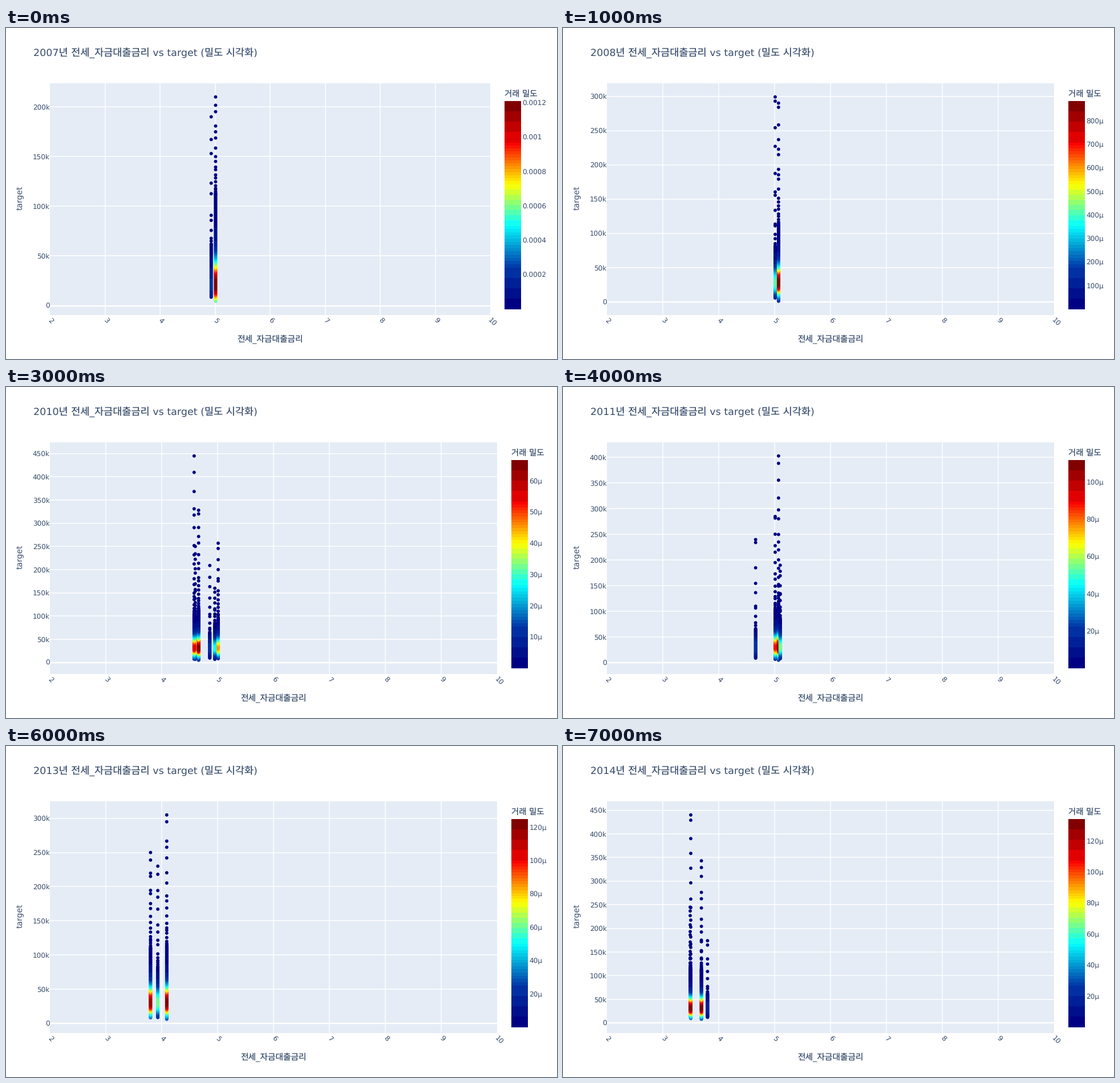
These frames come from a looping animation (966 by 580 pixels, 8000 ms). A matplotlib script:

```python
import numpy as np
import matplotlib.pyplot as plt
from matplotlib.animation import FuncAnimation
from matplotlib.patches import Rectangle

W, H, DPI = 966, 580, 100
PX = 72 / DPI  # points per pixel
INK, PANEL = "#384c6b", "#e5ecf6"
LEFT, TOP, BOTTOM = 77, 97, 502.5
DOT_TOP, DOT_BOTTOM = 120.8, 478.7  # heights of the extreme dots
BAR_TOP, BAR_H = 127.5, 365
RATE = "전세_자금대출금리"

plt.rcParams["font.family"] = ["DejaVu Sans", "Noto Sans CJK JP"]
plt.rcParams["text.hinting"] = "none"

# year, lowest value (k), densest value (k), top density (µ),
# then one (rate, relative density, highest value) per column
CHARTS = [
    (2007, 4.5, 21.5, 1211, [(4.93, 0.16, 190), (5.01, 1, 210)]),
    (2008, 1, 29, 884, [(5.01, 0.47, 299), (5.07, 1, 290)]),
    (2009, 6, 34.5, 71.7, [(4.57, 0.46, 286), (4.86, 0.72, 300),
                           (4.93, 0.58, 218), (5.005, 1, 315)]),
    (2010, 5, 33, 66.7, [(4.6, 0.75, 250), (4.58, 0.85, 445),
                         (4.66, 1, 328), (4.86, 0.18, 209),
                         (4.95, 0.42, 160), (5.01, 0.68, 257)]),
    (2011, 5, 32, 112, [(4.66, 0.2, 240), (5.01, 0.8, 285),
                        (5.07, 1, 403), (5.1, 0.5, 190)]),
    (2012, 7.5, 30, 32.2, [(4.09, 0.86, 245), (4.13, 0.82, 130),
                           (4.42, 0.22, 235), (4.58, 0.17, 220),
                           (5.01, 0.92, 207), (5.07, 1, 353),
                           (5.1, 0.98, 150)]),
    (2013, 6, 31, 125, [(3.8, 0.95, 250), (3.93, 0.5, 230),
                        (4.09, 1, 305)]),
    (2014, 8, 33, 134.2, [(3.49, 0.97, 245), (3.5, 0.98, 440),
                          (3.69, 1, 343), (3.8, 0.14, 174)]),
]

# the colour bar rises through five equal spans, each in flat steps
JET = np.array([(0, 0, 131), (0, 60, 170), (5, 255, 255),
                (255, 255, 0), (250, 0, 0), (128, 0, 0)]) / 255
STEPS = (4, 13, 8, 14, 4)
EDGES = np.append(np.concatenate(
    [(k + np.arange(n) / n) / 5 for k, n in enumerate(STEPS)]), 1)
MID = (EDGES[:-1] + EDGES[1:]) / 2
TONE = EDGES[:-1] * (1 - MID) + EDGES[1:] * MID
BANDS = np.column_stack([np.interp(TONE, np.linspace(0, 1, 6), c)
                         for c in JET.T])


def shade(v):
    i = np.searchsorted(EDGES, v, side="right") - 1
    return BANDS[np.clip(i, 0, len(BANDS) - 1)]


def density(y, peak):
    d = np.abs(y - peak) / np.where(y < peak, 19, 25)
    return (1 + d ** 2.4) ** -1.4


def column(rng, low, weight, top):
    """Packed dots, thinning out towards the highest one."""
    solid = 52 + 60 * weight
    n = int(10 + 12 * weight)
    u = (np.arange(n) + rng.uniform(0, 0.9, n)) / n
    tail = solid + (top - solid) * u ** 2.5
    return np.concatenate([np.arange(low, solid, 0.8), tail, [top]])


def bar_labels(vmax):
    """Ticks at the smallest round step that gives at most eight."""
    step = next(s for s in (5, 10, 20, 50, 100, 200) if vmax / s < 9)
    for v in range(step, int(vmax) + 1, step):
        yield v, f"{v / 1e6:.4f}".rstrip("0") if vmax > 1000 else f"{v}µ"


fig = plt.figure(figsize=(W / DPI, H / DPI), dpi=DPI, facecolor="white")
ax = fig.add_axes([0, 0, 1, 1])


def text(x, y, s, size, **kw):
    ax.text(x, y, s, fontsize=size * PX, color=INK, **kw)


def line(xs, ys, width):
    ax.plot(xs, ys, color="white", lw=width * PX, solid_capstyle="butt",
            zorder=2)


def draw_axes(to_x, to_y, right):
    ax.add_patch(Rectangle((LEFT, TOP), right - LEFT, BOTTOM - TOP,
                           fc=PANEL, lw=0))
    for k in range(2, 11):
        x = to_x(k)
        if 2 < k < 10:
            line([x, x], [TOP, BOTTOM], 1.5)
        digits = len(str(k))
        text(x + 1.5 * digits, 511 + 2.5 * digits, str(k), 12, rotation=-45,
             ha="center", va="center")
    for k in range(0, 500, 50):
        y = to_y(k)
        if y < TOP:
            break
        line([LEFT, right], [y, y], 1.5 if k else 2.5)
        text(76.5, y + 4.5, f"{k}k" if k else "0", 12, ha="right")
    text((LEFT + right) / 2, 550, RATE, 14.7, ha="center")
    text(25, 297.5, "target", 14, rotation=90, ha="center", va="center")


def draw_bar(vmax, x):
    base = BAR_TOP + BAR_H
    ax.bar(np.full(len(BANDS), x), -np.diff(EDGES) * BAR_H, 29,
           bottom=base - EDGES[:-1] * BAR_H, align="edge", color=BANDS,
           lw=0, antialiased=False)
    for v, label in bar_labels(vmax):
        text(x + 31.5, base + 5 - v / vmax * BAR_H, label, 12)
    text(x + 0.5, 119.5, "거래 밀도", 14.4)


def update(i):
    year, low, peak, vmax, cols = CHARTS[i]
    rng = np.random.default_rng(year)
    right = 849 if vmax > 1000 else 861  # long bar labels need room
    high = max(top for _, _, top in cols)
    scale = (DOT_BOTTOM - DOT_TOP) / (high - low)

    def to_x(rate):
        return LEFT + (rate - 2) * (right - LEFT) / 8

    def to_y(value):
        return DOT_BOTTOM - (value - low) * scale

    ax.clear()
    ax.axis("off")
    text(48.5, 48.5, f"{year}년 {RATE} vs target (밀도 시각화)", 17.5)
    draw_axes(to_x, to_y, right)
    for rate, weight, top in cols:
        start = low if weight == 1 else low + rng.uniform(1, 5)
        ys = column(rng, start, weight, top)
        ax.scatter(np.full(len(ys), to_x(rate)), to_y(ys),
                   s=(5.9 * PX) ** 2, c=shade(weight * density(ys, peak)),
                   linewidths=0, zorder=3, snap=False)
    draw_bar(vmax, right + 25)
    ax.set_xlim(0, W)
    ax.set_ylim(H, 0)
    return []


anim = FuncAnimation(fig, update, frames=len(CHARTS), interval=1000,
                     init_func=lambda: [], repeat=True, repeat_delay=0)
plt.show()
```
